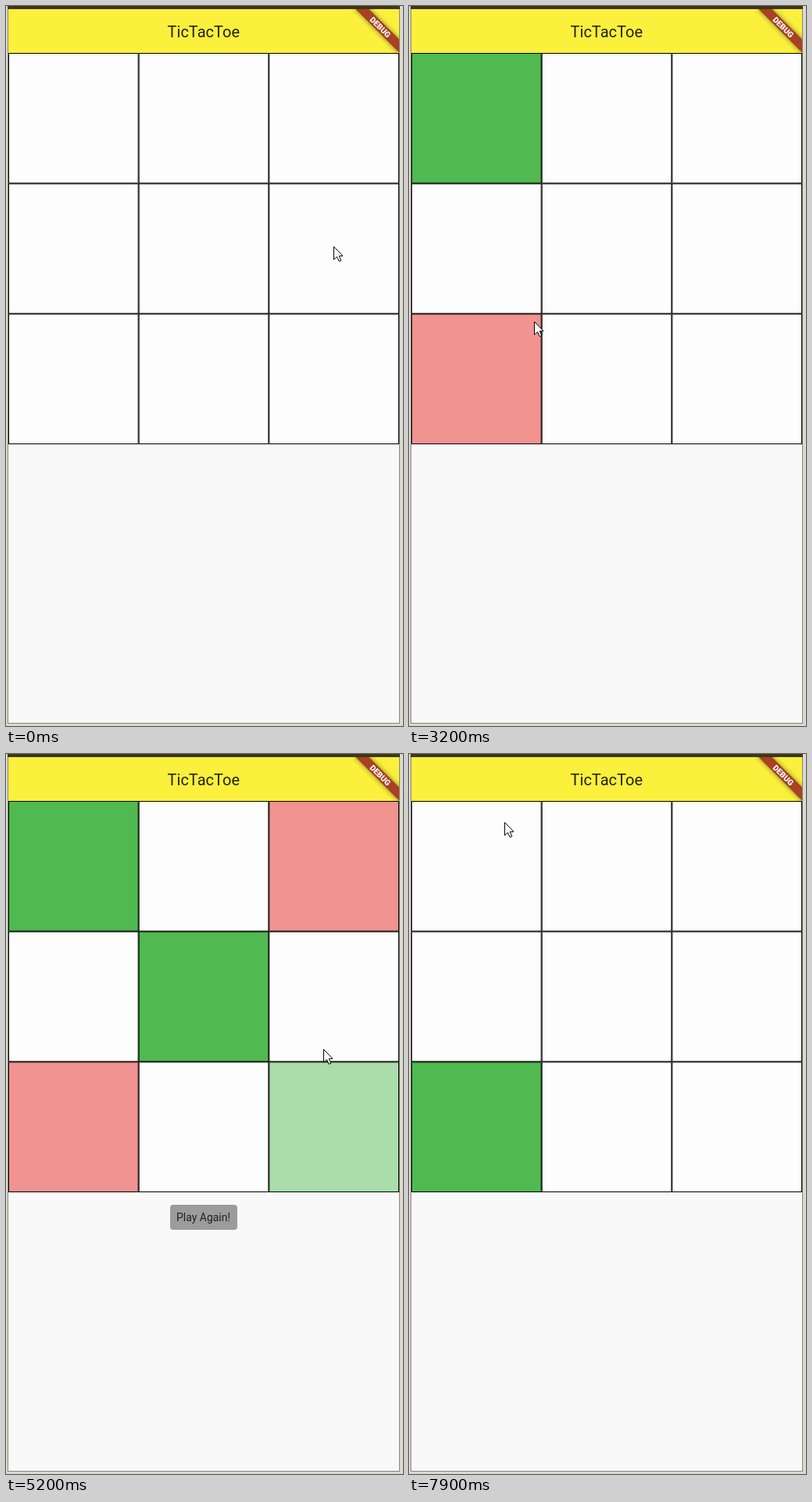
Animation, 508 px wide and 920 px high, one loop 8000 ms. Source, as an HTML page with a canvas:

```html
<!DOCTYPE html>
<html lang="en">
<head>
<meta charset="utf-8">
<title>TicTacToe</title>
<style>
html, body { margin: 0; width: 100%; height: 100%; overflow: hidden; }
canvas { display: block; }
</style>
</head>
<body>
<canvas id="stage" width="508" height="920"></canvas>
<script>
const ctx = document.getElementById('stage').getContext('2d');
const LOOP = 8000, STEP = 100, FADE = 320;
const SIZE = 500 / 3;
const GREEN = '#50b950', RED = '#e53532';

// Players alternate within a game; each move is [time, cell]
const games = [
  { moves: [[2700, 0], [3030, 6], [3400, 4], [3850, 2], [5050, 8]], won: 5050, reset: 6500 },
  { moves: [[7300, 6]], won: LOOP, reset: LOOP }
];
const { won, reset } = games[0];
const button = { x: 210, y: 576, w: 86, h: 32 };

const corner = cell => [3 + (cell % 3) * SIZE, 60 + Math.floor(cell / 3) * SIZE];
const center = cell => corner(cell).map(v => v + SIZE / 2);

const stops = [
  [1000, 419, 307], [2600, 90, 156], [3030, ...center(6)], [3400, ...center(4)],
  [3700, 421, 171], [5050, ...center(8)], [5200, 406, 377],
  [reset, 253, 598], [6800, 245, 567], [7300, ...center(6)], [7900, 122, 87]
];

const progress = (t, start, length) => Math.min(1, Math.max(0, (t - start) / length));

function cursorAt(t) {
  const next = stops.findIndex(stop => stop[0] > t);
  if (next <= 0) return stops.at(next).slice(1);
  const [start, x0, y0] = stops[next - 1], [end, x1, y1] = stops[next];
  const p = progress(t, start, end - start), ease = p * p * (3 - 2 * p);
  return [x0 + (x1 - x0) * ease, y0 + (y1 - y0) * ease].map(Math.round);
}

function rect(x, y, w, h, color) {
  ctx.fillStyle = color;
  ctx.fillRect(x, y, w, h);
}

function label(text, x, y, font, color) {
  ctx.font = font + ' Roboto, sans-serif';
  ctx.textAlign = 'center';
  ctx.fillStyle = color;
  ctx.fillText(text, x, y);
}

function drawBanner() {
  ctx.save();
  ctx.beginPath();
  ctx.rect(3, 4, 500, 56);
  ctx.clip();
  ctx.translate(503, 3);
  ctx.rotate(Math.PI / 4);
  ctx.shadowColor = 'rgba(0,0,0,.5)';
  ctx.shadowBlur = 6;
  rect(-40, 28, 80, 12, '#aa4026');
  ctx.shadowColor = 'transparent';
  label('DEBUG', 0, 37.7, '900 10.2px', '#fff');
  ctx.restore();
}

function drawBoard(t) {
  rect(3, 60, 500, 500, '#fdfdfd');
  for (const game of games) {
    game.moves.forEach(([time, cell], turn) => {
      const loser = turn % 2 === 1;
      const end = loser ? game.won : game.reset;
      ctx.globalAlpha = progress(t, time, FADE) * (1 - progress(t, end, FADE));
      rect(...corner(cell), SIZE, SIZE, loser ? RED : GREEN);
    });
  }
  ctx.globalAlpha = 1;
  ctx.strokeStyle = '#000';
  ctx.lineWidth = 1;
  for (let cell = 0; cell < 9; cell++) {
    const [x, y] = corner(cell);
    ctx.strokeRect(x + .5, y + .5, SIZE - 1, SIZE - 1);
  }
}

function drawButton(t) {
  if (t < won || t >= reset + 200) return;
  const { x, y, w, h } = button;
  ctx.save();
  ctx.globalAlpha = progress(t, won, STEP);
  ctx.beginPath();
  ctx.roundRect(x, y, w, h, 4);
  ctx.fillStyle = '#9c9c9c';
  ctx.fill();
  if (t >= reset - STEP) {
    ctx.clip();
    ctx.beginPath();
    ctx.arc(254, 593, 14 + (t - reset) / 10, 0, Math.PI * 2);
    ctx.fillStyle = '#9297a6';
    ctx.fill();
  }
  label('Play Again!', x + w / 2 - .5, 597, '14px', '#222');
  ctx.restore();
}

const arrow = new Path2D('M.5 .5V17L4.5 13.4L7.2 19.3L9.8 18.2L7.2 12.3H12Z');
const hand = new Path2D('M.5 2Q2-.5 3.5 2V8Q5 6.5 6.5 8.5Q8 7.5 9.5 9.5Q12 8.5 12.5 11V16Q12 19 10.5 20V22.5H2.5V20L-3 13Q-3.5 10.5-1.5 11L.5 13Z');
const knuckles = new Path2D('M3.5 8V12M6.5 9V12.5M9.5 10V13');

function drawCursor(t) {
  const [x, y] = cursorAt(t);
  const { x: left, y: top, w, h } = button;
  const hover = t >= won && t < reset + 200 &&
    x >= left && x < left + w && y >= top && y < top + h;
  const shape = hover ? hand : arrow;
  ctx.save();
  ctx.translate(x, y);
  ctx.fillStyle = '#fff';
  ctx.strokeStyle = '#000';
  ctx.fill(shape);
  ctx.stroke(shape);
  if (hover) ctx.stroke(knuckles);
  ctx.restore();
}

function draw(t) {
  rect(0, 0, 508, 920, '#dadacc');
  rect(2, 0, 502, 917, '#85857a');
  rect(3, 3, 500, 913, '#f9f9f9');
  rect(2, 0, 502, 4, '#3d3812');
  rect(3, 4, 500, 56, '#fbf03c');
  label('TicTacToe', 252.8, 40, '20px', '#222208');
  drawBanner();
  drawBoard(t);
  drawButton(t);
  drawCursor(t);
}

function tick() {
  draw(Math.floor(performance.now() % LOOP / STEP) * STEP);
  requestAnimationFrame(tick);
}
tick();
</script>
</body>
</html>
```
